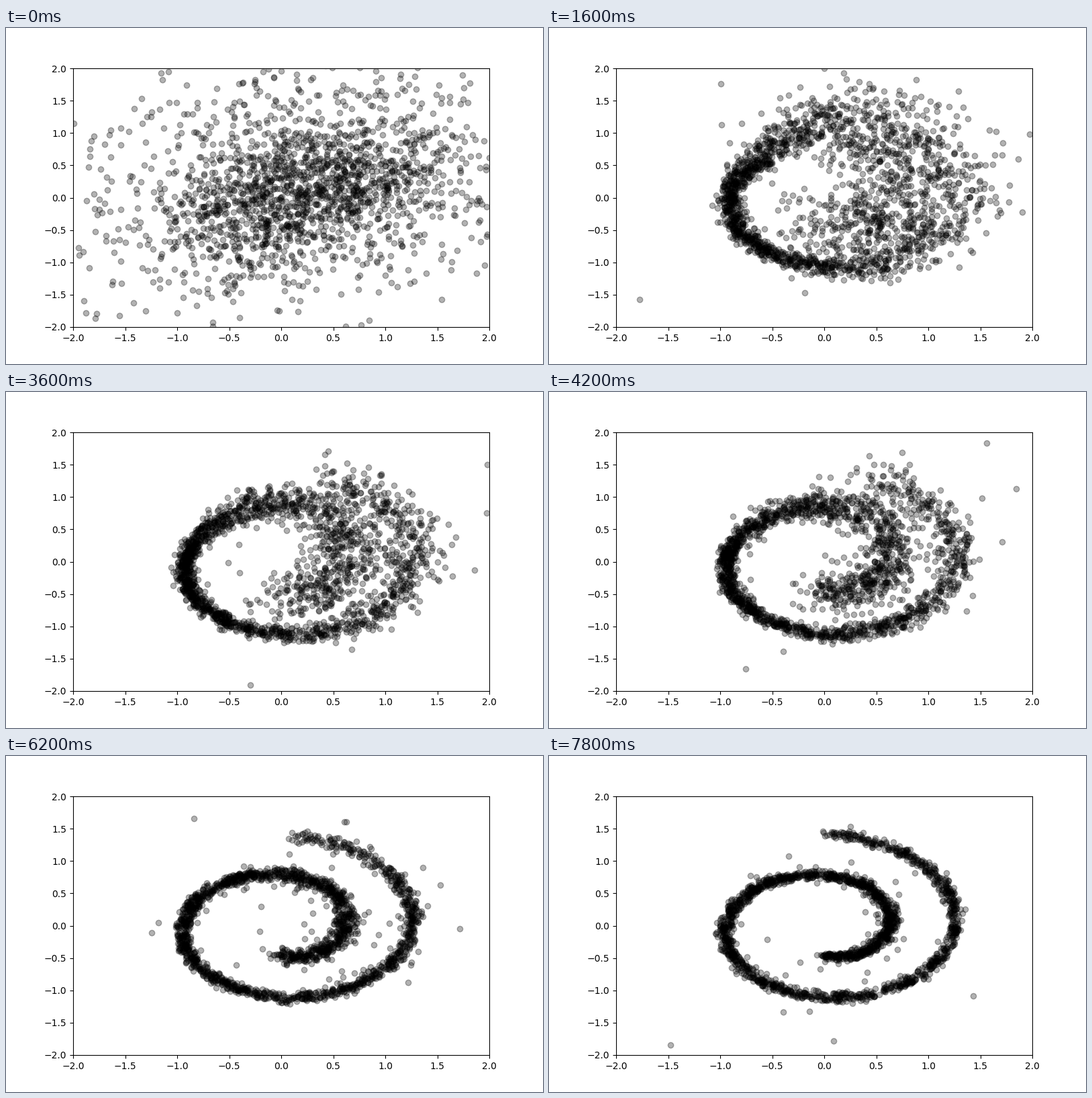
Animation, 800 px wide and 500 px high, one loop 8000 ms. Source, as a matplotlib script:

```python
import numpy as np
import matplotlib.pyplot as plt
from matplotlib.animation import FuncAnimation

COUNT = 2000
FRAMES = 40
INTERVAL = 200


def smooth(x):
    x = np.clip(x, 0, 1)
    return x * x * (3 - 2 * x)


def swiss_roll(u):
    t = 1.5 * np.pi * (1 + 2 * u)
    return np.column_stack([t * np.cos(t), t * np.sin(t)]) / 10


def broad_cloud(rng):
    core = rng.multivariate_normal([0.2, 0.1], [[0.5, 0.17], [0.17, 0.33]], COUNT)
    wide = rng.normal([0.25, 0.3], [1.15, 1.2], (COUNT, 2))
    return np.where(rng.random((COUNT, 1)) < 0.42, wide, core)


def samples(step):
    """Fresh draw from a model that settles onto the roll as step grows."""
    rng = np.random.default_rng(100 + step)
    blur = max(0.0, 1 - step / 34)
    mix = np.exp(-step / 2)

    # the left side of the roll gets more points midway
    u = rng.random(COUNT)
    lean = 0.06 + 1.1 * blur * (1 - blur)
    u = u - lean / (2 * np.pi) * np.sin(2 * np.pi * (u - 0.53))
    u = np.clip(u, 0, 1) * (1 - 0.06 * blur)

    # both ends of the roll sharpen later than its middle
    loose = smooth((np.abs(u - 0.55) - 0.06) / 0.25)
    rate = np.where(u < 0.55, 1.3, 2 - 0.5 * smooth((u - 0.85) / 0.1))
    sigma = 0.038 + 0.02 * blur + 0.38 * loose * blur ** rate
    stray = rng.random(COUNT) < 0.04
    sigma[stray] += 0.03 + 0.14 * loose[stray]
    sigma[rng.random(COUNT) < 0.007] = 0.85

    # the upper arm starts out pulled towards the outer end
    pts = swiss_roll(u)
    arm = smooth((0.46 - u) / 0.18) * smooth((u - 0.16) / 0.1)
    pts[:, 1] += 0.85 * arm * blur ** 2

    noise = rng.normal(size=(COUNT, 2)) * sigma[:, None]
    drift = rng.normal(0, 0.02, 2) * blur
    pts += (1 - mix) * noise + drift
    return (1 - mix) * pts + mix * broad_cloud(rng)


fig, ax = plt.subplots(figsize=(8, 5), dpi=100)
ax.set_xlim(-2, 2)
ax.set_ylim(-2, 2)
dots = ax.scatter(*samples(0).T, color="black", alpha=0.3)


def update(step):
    dots.set_offsets(samples(step))
    return (dots,)


anim = FuncAnimation(fig, update, frames=FRAMES, interval=INTERVAL,
                     repeat=True, repeat_delay=0)
plt.show()
```
